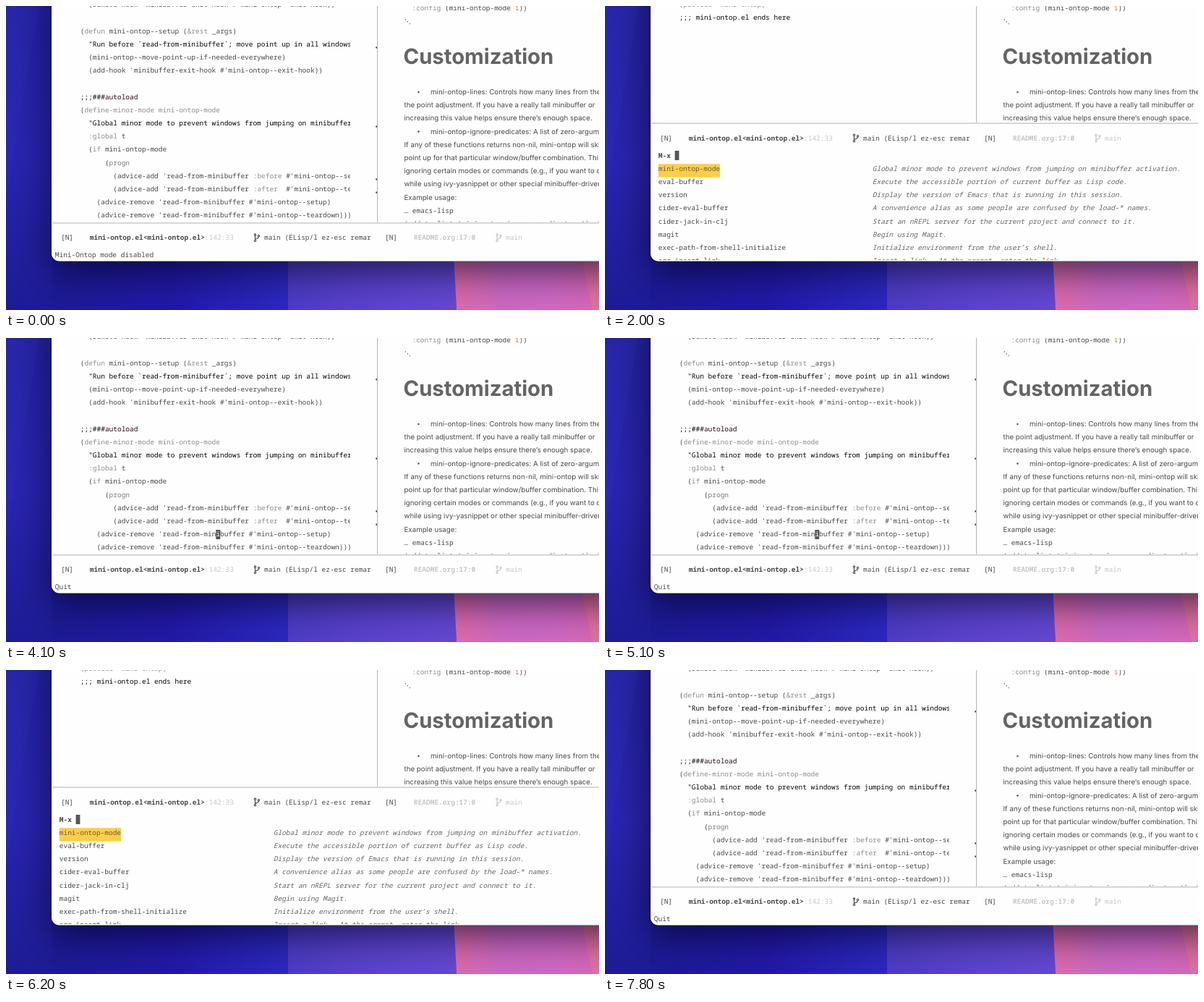
These frames come from a looping animation (820 px wide and 420 px high, 8000 ms). An HTML page with a canvas:

```html
<!DOCTYPE html>
<html lang="en">
<head>
<meta charset="utf-8">
<title>Mini-Ontop</title>
<style>
  html, body { margin: 0; width: 100%; height: 100%; overflow: hidden; background: #1c1a8c; }
  canvas { display: block; width: 820px; height: 420px; }
</style>
</head>
<body>
<canvas id="stage"></canvas>
<script>
const W = 820, H = 420, LOOP = 8000;
const canvas = document.getElementById('stage');
const ctx = canvas.getContext('2d');
const dpr = window.devicePixelRatio || 1;
canvas.width = W * dpr;
canvas.height = H * dpr;
ctx.scale(dpr, dpr);
ctx.textRendering = 'geometricPrecision';

const SIZE = 9.48, CH = SIZE * 0.6, ROW = 18.21;
const MONO = SIZE + 'px "Noto Sans Mono", "DejaVu Sans Mono", monospace';
const SANS = '9.74px Inter, Roboto, sans-serif';
const PAPER = '#fefefe', TEXT = '#4a4a4a', SOFT = '#8e8e8e', FAINT = '#c6c6c6', BLACK = '#0a0a0a';
const CODE_X = 102.8, DOC_X = 550.5, EDGE = 476;

// Each code line: indent, then text and colour pairs.
const setupCode = [
  [2, "(remove-hook 'minibuffer-exit-hook #'mini-ontop--exit-hook))", TEXT],
  [0],
  [0, '(', TEXT, 'defun', SOFT, ' mini-ontop--setup (', TEXT, '&rest', SOFT, ' _args)', TEXT],
  [2, '"Run before `read-from-minibuffer`; move point up in all windows."', BLACK],
  [2, '(mini-ontop--move-point-up-if-needed-everywhere)', TEXT],
  [2, "(add-hook 'minibuffer-exit-hook #'mini-ontop--exit-hook))", TEXT],
  [0],
  [0, ';;;###', BLACK, 'autoload', '#2c0f14'],
  [0, '(', TEXT, 'define-minor-mode mini-ontop-mode', SOFT],
  [2, '"Global minor mode to prevent windows from jumping on minibuffer activation."', BLACK],
  [2, ':global', SOFT, ' t', TEXT],
  [2, '(', TEXT, 'if', SOFT, ' mini-ontop-mode', TEXT],
  [6, '(', TEXT, 'progn', '#7c7c7c'],
  [8, "(advice-add 'read-from-minibuffer ", TEXT, ':before', SOFT, " #'mini-ontop--setup)", TEXT],
  [8, "(advice-add 'read-from-minibuffer ", TEXT, ':after', SOFT, "  #'mini-ontop--teardown))", TEXT],
  [4, "(advice-remove 'read-from-minibuffer #'mini-ontop--setup)", TEXT],
  [4, "(advice-remove 'read-from-minibuffer #'mini-ontop--teardown)))", TEXT]
];
const endCode = [
  [0, "(provide 'mini-ontop)", SOFT],
  [0, ';;; mini-ontop.el ends here', BLACK]
];
const docs = [
  '*mini-ontop-lines: Controls how many lines from the bottom',
  'the point adjustment. If you have a really tall minibuffer or',
  'increasing this value helps ensure there’s enough space.',
  '*mini-ontop-ignore-predicates: A list of zero-argument',
  'If any of these functions returns non-nil, mini-ontop will skip',
  'point up for that particular window/buffer combination. This',
  'ignoring certain modes or commands (e.g., if you want to disable',
  'while using ivy-yasnippet or other special minibuffer-driven',
  'Example usage:'
];
const commands = [
  ['mini-ontop-mode', 'Global minor mode to prevent windows from jumping on minibuffer activation.'],
  ['eval-buffer', 'Execute the accessible portion of current buffer as Lisp code.'],
  ['version', 'Display the version of Emacs that is running in this session.'],
  ['cider-eval-buffer', 'A convenience alias as some people are confused by the load-* names.'],
  ['cider-jack-in-clj', 'Start an nREPL server for the current project and connect to it.'],
  ['magit', 'Begin using Magit.'],
  ['exec-path-from-shell-initialize', 'Initialize environment from the user’s shell.'],
  ['org-insert-link', 'Insert a link.  At the prompt, enter the link.']
];

// Start time, view, echo text and whether the block cursor is lit.
const timeline = [
  [0, 'code', 'Mini-Ontop mode disabled', false],
  [500, 'code', '', false],
  [1500, 'code', '', true],
  [2000, 'prompt', '', true],
  [2500, 'prompt', '', false],
  [3000, 'prompt', '', true],
  [3500, 'prompt', '', false],
  [4000, 'prompt', '', true],
  [4100, 'code', 'Quit', true],
  [4600, 'code', 'Quit', false],
  [5100, 'code', 'Quit', true],
  [5200, 'prompt', '', true],
  [5700, 'prompt', '', false],
  [6200, 'prompt', '', true],
  [6300, 'code', 'Quit', true],
  [6800, 'code', 'Quit', false],
  [7300, 'code', 'Quit', true],
  [7800, 'code', 'Quit', false]
];

function write(str, x, y, color = TEXT, font = MONO) {
  ctx.font = font;
  ctx.fillStyle = color;
  ctx.fillText(str, x, y);
}

function rect(x, y, w, h, color) {
  ctx.fillStyle = color;
  ctx.fillRect(x, y, w, h);
}

function dot(x, y, r, color) {
  ctx.fillStyle = color;
  ctx.beginPath();
  ctx.arc(x, y, r, 0, Math.PI * 2);
  ctx.fill();
}

function poly(points, fill) {
  ctx.fillStyle = fill;
  ctx.beginPath();
  points.forEach(([x, y]) => ctx.lineTo(x, y));
  ctx.fill();
}

function blend(x0, y0, x1, y1, ...colors) {
  const g = ctx.createLinearGradient(x0, y0, x1, y1);
  colors.forEach((c, i) => g.addColorStop(i / (colors.length - 1), c));
  return g;
}

function clipped(x, y, w, h, draw) {
  ctx.save();
  ctx.beginPath();
  ctx.rect(x, y, w, h);
  ctx.clip();
  draw();
  ctx.restore();
}

function drawDesktop() {
  rect(0, 0, W, H, blend(0, 0, 0, H, '#2423a4', '#2924b0', '#1d1b94'));
  poly([[0, 0], [46, 0], [0, 270]], 'rgba(50,54,185,.2)');
  rect(63, 340, 327, 80, blend(63, 0, 390, 0, '#1c1a94', '#2118a6', '#2c28c0'));
  poly([[390, 340], [620, 340], [623, 420], [390, 420]], blend(390, 0, 622, 0, '#4c3cc4', '#5c42ce', '#6348d2'));
  poly([[619, 340], [820, 340], [820, 420], [623, 420]],
    blend(620, 0, 820, 0, '#e06aa8', '#cc68c2', '#cf68c4', '#d866b4'));
  poly([[794, 340], [820, 340], [820, 420], [811, 420]], '#e2709e');
}

function windowPath() {
  ctx.beginPath();
  ctx.roundRect(63, -40, 800, 392.5, 11);
}

function drawFrame() {
  ctx.save();
  ctx.shadowColor = 'rgba(0,0,20,.68)';
  ctx.shadowBlur = 52 * dpr;
  ctx.shadowOffsetY = 14 * dpr;
  ctx.fillStyle = PAPER;
  windowPath();
  ctx.fill();
  ctx.restore();
  ctx.strokeStyle = 'rgba(0,0,20,.6)';
  ctx.lineWidth = 1;
  ctx.stroke();
  ctx.fillStyle = PAPER;
  ctx.fill();
}

function drawCode(lines, base, bottom) {
  clipped(64, 0, EDGE - 64, bottom, () => lines.forEach(([indent, ...parts], i) => {
    let col = indent;
    for (let k = 0; k < parts.length; k += 2) {
      const color = parts[k + 1];
      write(parts[k], CODE_X + col * CH, base + i * ROW, color, (color === BLACK ? '500 ' : '') + MONO);
      col += parts[k].length;
    }
  }));
}

function drawDocs(bottom) {
  clipped(514, 0, W - 514, bottom, () => {
    const x = DOC_X + 11;
    write(':config', x, 5.6, SOFT);
    write('(mini-ontop-mode', x + 8 * CH, 5.6);
    write('1', x + 25 * CH, 5.6, '#c8703c');
    write('))', x + 26 * CH, 5.6);
    for (let i = 0; i < 3; i++) dot(552.3 + i * 3, 19 + i * 2.8, 0.7, TEXT);
    write('Customization', 549.5, 80, '#646464', '700 29.25px Inter, Roboto, sans-serif');
    docs.forEach((line, i) => {
      const y = 121.9 + i * ROW;
      const item = line[0] === '*';
      if (item) dot(570.5, y - 3, 1.2, TEXT);
      write(item ? line.slice(1) : line, item ? 587 : DOC_X, y, TEXT, SANS);
    });
    write('… emacs-lisp', DOC_X, 285.6);
    write("(add-to-list 'mini-ontop-ignore-predicates (", DOC_X, 303.6);
    write('lambda', DOC_X + 44 * CH, 303.6, SOFT);
  });
}

function drawBranch(x, y, color) {
  ctx.strokeStyle = color;
  ctx.lineWidth = 1.2;
  ctx.beginPath();
  ctx.moveTo(x + 2, y - 3);
  ctx.lineTo(x + 2, y + 4);
  ctx.moveTo(x + 7, y - 1.5);
  ctx.quadraticCurveTo(x + 7, y + 1, x + 2, y + 2);
  ctx.stroke();
  [[2, -4], [7, -2.6], [2, 4.4]].forEach(([dx, dy]) => {
    dot(x + dx, y + dy, 1.7, color);
    dot(x + dx, y + dy, 0.6, PAPER);
  });
}

function drawModeline(top) {
  const y = top + 23.6, bold = '700 ' + MONO;
  rect(513, 0, 1.2, top - 1, '#bcbcbc');
  rect(64, top - 0.6, W - 64, 1.3, '#c2c2c2');
  write('[N]', 76, y);
  write('mini-ontop.el<mini-ontop.el>', 115.8, y, TEXT, bold);
  write(':142:33', 115.8 + 28 * CH, y, FAINT);
  drawBranch(342.5, top + 20.2, TEXT);
  write('main (ELisp/l ez-esc remar', 357, y);
  write('[N]', 524, y);
  write('README.org', 564, y, FAINT, bold);
  write(':17:0', 564 + 10 * CH, y, FAINT, bold);
  drawBranch(677, top + 20.2, FAINT);
  write('main', 691, y, FAINT);
}

function drawEditor(echo, lit) {
  const top = 299.8;
  drawCode(setupCode, 1.1, top - 1);
  [3, 9, 13, 14].forEach(i => rect(511.4, 1.6 + i * ROW, 1.6, 2.2, '#333'));
  if (lit) {
    const x = CODE_X + 33 * CH;
    rect(x - 0.2, 265, CH + 0.2, 13, '#555');
    write('i', x, 1.1 + 15 * ROW, PAPER);
  }
  drawDocs(top - 1);
  drawModeline(top);
  write(echo, 67.8, 347.2);
}

function drawPrompt(lit) {
  const top = 162.1, base = 209.6;
  drawCode(endCode, 1.1, top - 1);
  drawDocs(top - 1);
  drawModeline(top);
  write('M-x', 73.8, base, TEXT, '600 ' + MONO);
  if (lit) rect(96.6, 200, 5.8, 13, '#555');
  rect(73.8, 218.2, 15 * CH, 18.3, '#ffcd47');
  clipped(64, 0, W - 64, 351, () => commands.forEach(([name, note], i) => {
    const y = base + (i + 1) * ROW;
    write(name, 73.8, y, i ? TEXT : '#6a5c34');
    write(note, 369.8, y, '#686868', 'italic ' + MONO);
  }));
}

let shown = null;
function tick(now) {
  const t = now % LOOP;
  const state = timeline.findLast(s => s[0] <= t);
  if (state !== shown) {
    shown = state;
    const [, view, echo, lit] = state;
    drawDesktop();
    drawFrame();
    if (view === 'code') drawEditor(echo, lit);
    else drawPrompt(lit);
  }
  requestAnimationFrame(tick);
}
tick(performance.now());
</script>
</body>
</html>
```
